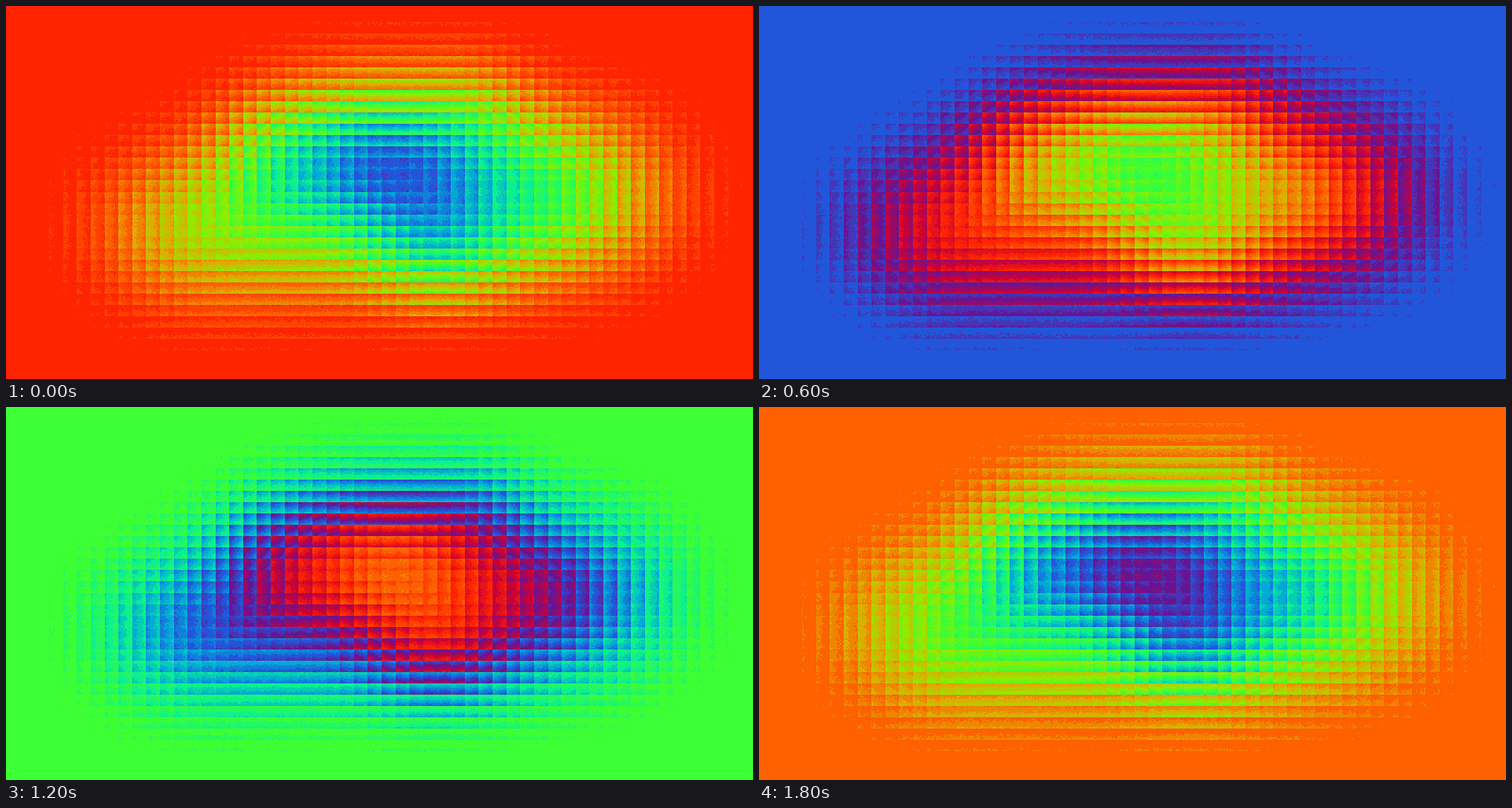
These frames come from a looping animation (1058x529 px, 2 s). An HTML page with a canvas:

```html
<!DOCTYPE html>
<html lang="en">
<head>
<meta charset="utf-8">
<title>Cycling colour field</title>
<style>
  html, body { margin: 0; width: 100%; height: 100%; overflow: hidden; background: #ff2400; }
  canvas { display: block; width: 100%; height: 100%; }
</style>
</head>
<body>
<canvas id="stage" width="1058" height="529"></canvas>
<script>
const W = 1058, H = 529, STEP = 200;
const ctx = document.getElementById('stage').getContext('2d');

const wheel = ['#ff2400', '#c80038', '#681492', '#2256da', '#00aad7',
               '#0cf090', '#3cff34', '#91eb00', '#dcae00', '#ff6000'];
const LEVELS = wheel.length * 2;

// Soft bumps that add up to the hill
const bump = (cx, cy, rx, ry, amp) => (x, y) =>
  amp * Math.exp(-(((x - cx) / rx) ** 2 + ((y - cy) / ry) ** 2) / 2);

const bumps = [
  bump(535, 225, 110, 76, 6.8),
  bump(770, 270, 108, 80, 4),
  bump(270, 315, 93, 75, 2.7),
  bump(610, 350, 74, 55, 3.1),
  bump(380, 225, 60, 65, 1.8),
  bump(430, 360, 80, 55, 1.2),
  bump(670, 140, 50, 50, 1)
];

const heightAt = (x, y) =>
  Math.max(0, bumps.reduce((sum, b) => sum + b(x, y), -0.25));

// Each cell shows its surroundings inverted, like a lens array
function lens(p, size, offset) {
  const centre = (Math.floor((p - offset) / size) + 0.5) * size + offset;
  return centre - 3 * (p - centre);
}

function grain(x, y) {
  let h = Math.imul(x + 1, 374761393) ^ Math.imul(y + 1, 668265263);
  h = Math.imul(h ^ (h >>> 13), 1274126177);
  h = Math.imul(h ^ (h >>> 16), 2246822519);
  return ((h ^ (h >>> 15)) >>> 0) / 2 ** 32;
}

function buildLevels() {
  const levels = new Uint8Array(W * H);
  for (let y = 0; y < H; y++) {
    const ly = lens(y + 0.5, 16.04, 6.9);
    for (let x = 0; x < W; x++) {
      const v = heightAt(lens(x + 0.5, 19.625, 2.25), ly);
      levels[y * W + x] = Math.floor(2 * v + 0.15 + 0.7 * grain(x >> 1, y >> 1));
    }
  }
  return levels;
}

const channel = (hex, i) => parseInt(hex.slice(1 + 2 * i, 3 + 2 * i), 16);

// Wheel colours with one halfway shade between neighbours, packed as ABGR
const palette = Array.from({ length: LEVELS }, (_, i) => {
  const a = wheel[i >> 1], b = wheel[((i + 1) >> 1) % wheel.length];
  const mid = c => (channel(a, c) + channel(b, c)) >> 1;
  return (255 << 24 | mid(2) << 16 | mid(1) << 8 | mid(0)) >>> 0;
});

const levels = buildLevels();
const image = ctx.createImageData(W, H);
const pixels = new Uint32Array(image.data.buffer);

function draw(step) {
  const base = step * 2 + LEVELS;
  for (let i = 0; i < pixels.length; i++) {
    pixels[i] = palette[(base - levels[i]) % LEVELS];
  }
  ctx.putImageData(image, 0, 0);
}

let shown = -1;
function tick(now) {
  const step = Math.floor(now / STEP) % wheel.length;
  if (step !== shown) draw(shown = step);
  requestAnimationFrame(tick);
}

draw(0);
requestAnimationFrame(tick);
</script>
</body>
</html>
```
